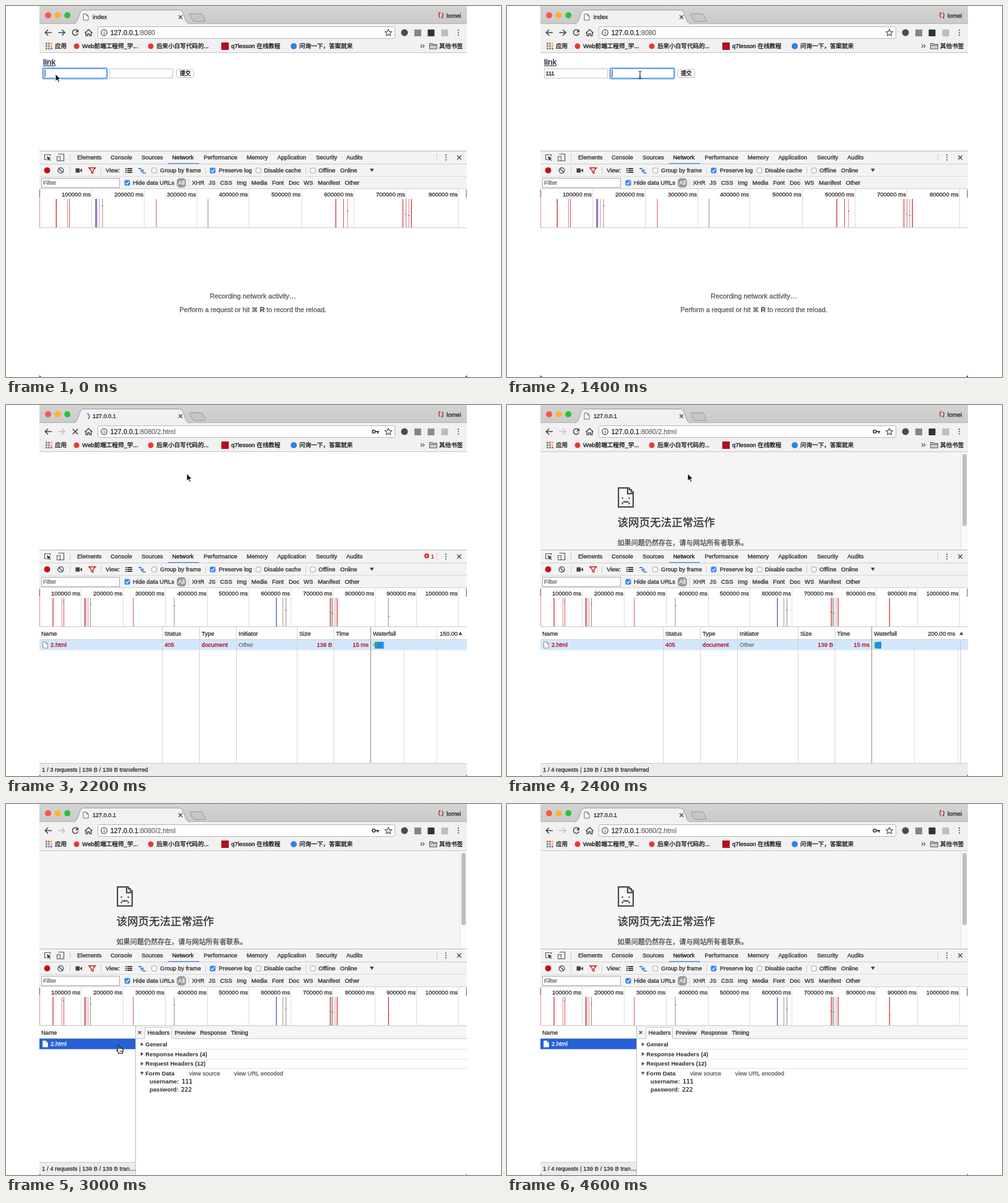
Recreate the animation shown at these times as an HTML page. Size 800x600 px, loop 4.8 s.

```html
<!DOCTYPE html>
<html lang="zh-CN">
<head>
<meta charset="utf-8">
<title>Form post demo</title>
<style>
html, body { margin: 0; width: 100%; height: 100%; overflow: hidden; background: #fff; }
svg { display: block; width: 800px; height: 600px; }
text { font-family: "Liberation Sans", "Noto Sans CJK SC", "Noto Sans CJK", sans-serif; white-space: pre; stroke-width: .28px; }
text[font-weight] { stroke-width: 0; }
.mono { font-family: "DejaVu Sans Mono", monospace; }
.sym { font-family: "DejaVu Sans", sans-serif; }
</style>
</head>
<body>
<svg id="stage" viewBox="0 0 800 600" xmlns="http://www.w3.org/2000/svg"></svg>
<script>
const LOOP = 4800;
const INK = '#2a2a2a', RED = '#b3061c';

// Markup helpers
const rect = (x, y, w, h, fill, more = '') =>
  `<rect x="${x}" y="${y}" width="${w}" height="${h}" fill="${fill}" ${more}/>`;
const box = (x, y, w, h, fill, stroke, r = 0) =>
  rect(x + .5, y + .5, w - 1, h - 1, fill, `stroke="${stroke}" rx="${r}"`);
const disc = (x, y, r, fill) => `<circle cx="${x}" cy="${y}" r="${r}" fill="${fill}"/>`;
const path = (d, stroke, w = 1, fill = 'none') =>
  `<path d="${d}" stroke="${stroke}" stroke-width="${w}" fill="${fill}"/>`;
const text = (x, y, s, size = 9.5, fill = INK, more = '') =>
  `<text x="${x}" y="${y}" font-size="${size}" fill="${fill}" stroke="${fill}" ${more}>${s}</text>`;
const endText = (x, y, s, size, fill) => text(x, y, s, size, fill, 'text-anchor="end"');
const bold = (x, y, s, size = 9.5, fill = INK) => text(x, y, s, size, fill, 'font-weight="bold"');
const vline = (x, y1, y2, c, w = 1) => rect(x, y1, w, y2 - y1, c);
const hline = (y, x1, x2, c, h = 1) => rect(x1, y, x2 - x1, h, c);
const cross = (x, y, r, c = '#555', w = 1.3) =>
  path(`M${x - r} ${y - r}l${2 * r} ${2 * r}M${x + r} ${y - r}l${-2 * r} ${2 * r}`, c, w);
const dots3 = (x, y, gap = 3.8) => [-1, 0, 1].map(i => disc(x, y + i * gap, 1.1, '#555')).join('');
const row = (y, items) => items.map(([x, s]) => text(x, y, s)).join('');
const group = (id, body) => `<g id="${id}">${body}</g>`;
const docIcon = (x, y, c = '#666') => path(`M${x} ${y}h5l3 3v7h-8zM${x + 5} ${y}v3h3`, c, 1, '#fff');
const check = (x, y, on) => on
  ? rect(x, y, 9, 9, '#3584ee', 'rx="2"') + path(`M${x + 2} ${y + 4.6}l2 2.2 3.2-4.6`, '#fff', 1.3)
  : box(x, y, 9, 9, '#fff', '#a0a0a0', 2);

function chrome() {
  let s = rect(54, 0, 691, 29, 'url(#bar)');
  s += hline(28, 54, 745, '#b2b2b2');
  s += rect(54, 29, 691, 46, '#f1f1f1');
  s += path('M109 29C114 28 114 26 116 22L120 10Q121.5 6.5 125 6.5H280Q284 6.5 285.5 10L290 22C292 27 293 28.5 297 29', '#999', 1, '#f1f1f1');
  s += rect(111, 28.5, 184, 1.5, '#f1f1f1');
  s += path('M298 12.5H315Q317 12.5 318 14.5L322 23Q322.5 25 321 25H305Q302.5 25 301.5 23L297 14Q296.5 12.5 298 12.5Z', '#979797', 1, '#c6c6c6');
  ['#fc5550', '#fdb42b', '#27c33b'].forEach((c, i) => s += disc(68 + i * 15.6, 15, 5, c));
  s += cross(282, 18, 3, '#444', 1.3);
  s += path('M701.5 11Q697.5 15 701.5 19M704 19Q708.5 15 704.5 11M702 11h-2.5M704 19h2.5', '#b8292c', 1.4);
  s += text(712, 18.6, 'lomei', 9.8, '#222');
  // toolbar
  s += path('M74 43H63.5M68 38.3L63.3 43L68 47.7', '#444', 1.6);
  s += path('M127.5 43.5L133.5 38L139.5 43.5M129.2 42.5V48H132V45H135V48H137.8V42.5', '#444', 1.4);
  s += box(148, 33, 481, 20, '#fff', '#b4b4b4', 2);
  s += `<circle cx="158.5" cy="43" r="4.8" fill="none" stroke="#444" stroke-width="1.2"/>`;
  s += rect(158, 42.2, 1.1, 3.4, '#444') + rect(158, 40.2, 1.1, 1.1, '#444');
  s += path('M618 37.7L619.6 41.2L623.4 41.6L620.6 44.2L621.4 48L618 46L614.6 48L615.4 44.2L612.6 41.6L616.4 41.2Z', '#444', 1.1);
  s += disc(644, 43, 5.5, '#4c4c4c') + rect(660, 38, 11, 11, '#858585');
  s += rect(703.5, 38, 11, 11, '#bdbdbd') + dots3(731, 43);
  // bookmarks
  const hues = ['#e04a3f', '#e04a3f', '#f0b429', '#3e9b4f', '#4c82e6', '#f0b429', '#3e9b4f', '#4c82e6', '#e04a3f'];
  hues.forEach((c, i) => s += rect(64 + i % 3 * 4, 59.5 + (i / 3 | 0) * 4, 2.7, 2.7, c));
  s += disc(114, 65, 4.5, '#e8392f') + disc(234, 65, 4.5, '#e8392f');
  s += rect(348, 59, 12, 12, '#b30d22') + disc(465, 65, 5, '#2f83e0');
  const mark = (x, t) => text(x, 68, t, 9.6, '#111');
  s += mark(79, '应用') + mark(123, 'Web前端工程师_学...') + mark(243, '后来小白写代码的...');
  s += mark(364, 'q7lesson 在线教程') + mark(474, '问询一下，答案就来') + mark(700, '其他书签');
  s += path('M670 62l2.5 2.7-2.5 2.7M673.5 62l2.5 2.7-2.5 2.7', '#444', 1.1);
  s += path('M684.5 60.5h4.5l1.3 1.5h6v7.5h-11.8zM684.5 63.5h11.8', '#666', 1.1, '#ccc');
  return s + hline(75, 54, 745, '#c4c4c4');
}

function devtools() {
  const sep = (x, y) => vline(x, y - 6, y + 6, '#ccc');
  let s = rect(54, 234, 691, 62, '#f3f3f3');
  s += hline(234, 54, 745, '#b9b9b9') + hline(255, 54, 745, '#cdcdcd');
  s += hline(275, 54, 745, '#dadada') + hline(295, 54, 745, '#cdcdcd');
  s += path('M66 248.5H62.5V240.5H71.5V243', '#555', 1.1) + path('M66 243l1.6 7.5 1.7-2.3 2.2 2.2 1-1-2.2-2.2 2.2-1.4z', 'none', 0, '#444');
  s += path('M85 240V239.5H93.5V250.5H88', '#555', 1.2) + box(82, 243, 6, 8, '#f3f3f3', '#555');
  s += sep(103, 245) + sep(696, 245) + dots3(711, 245) + cross(732.5, 245, 3.2, '#444');
  s += row(248, [[115, 'Elements'], [169, 'Console'], [219, 'Sources'], [319.5, 'Performance'], [389, 'Memory'],
    [438.5, 'Application'], [501, 'Security'], [550, 'Audits']]);
  s += text(268.5, 248, 'Network', 9.5, '#111') + hline(254, 262, 312, '#5b8cdd', 1.4);
  // record row
  s += disc(66.5, 265.8, 4.9, '#cb0a12');
  s += `<circle cx="88.5" cy="266" r="4.4" fill="none" stroke="#444" stroke-width="1.3"/>` + path('M85.4 263l6.2 6', '#444', 1.3);
  s += sep(103, 266) + rect(112.5, 262.5, 6.5, 7, '#444') + path('M119 266l4-3v6z', 'none', 0, '#444');
  s += path('M134 261.7H144.5L140.6 266.2V270.5L138 269V266.2Z', '#cc1520', 1.4) + sep(153, 266) + text(161, 269, 'View:');
  for (let i = 0; i < 3; i++) s += rect(193, 262 + i * 3, 2, 2, '#444') + rect(196, 262 + i * 3, 8, 2, '#444');
  s += rect(214, 262, 5, 1.7, '#3a6fc4') + rect(217, 264.8, 6, 1.7, '#3a6fc4') + rect(218, 267.4, 4, 1.7, '#3a6fc4') + rect(221, 269.4, 5, 1.5, '#3a6fc4');
  s += check(235, 261.5) + text(249, 269, 'Group by frame') + sep(322, 266);
  s += check(329.5, 261.5, 1) + text(344, 269, 'Preserve log');
  s += check(403.5, 261.5) + text(417, 269, 'Disable cache') + sep(484, 266);
  s += check(491.5, 261.5) + text(505, 269, 'Offline') + text(540, 269, 'Online');
  s += path('M588 263h6.5l-3.2 5.5z', 'none', 0, '#444');
  // filter row
  s += box(57, 278, 127, 16, '#fff', '#a9a9a9') + text(60, 289.3, 'Filter', 9.5, '#666');
  s += check(191.5, 281.5, 1) + text(205, 289.3, 'Hide data URLs');
  s += rect(276, 278.5, 15, 15, '#999', 'rx="5"') + text(278.3, 289.3, 'All', 9.5, '#fff') + vline(294.5, 280, 292, '#ccc');
  s += row(289.3, [[300.5, 'XHR'], [327.5, 'JS'], [346, 'CSS'], [373, 'Img'], [396.5, 'Media'], [430, 'Font'],
    [457, 'Doc'], [481, 'WS'], [504, 'Manifest'], [547.5, 'Other']]);
  return s;
}

// Overview: lines as [x, colour, width]
function overview(count, lines) {
  let s = rect(54, 296, 691, 63, '#fff');
  const step = 677.5 / count;
  for (let i = 1; i <= count; i++) {
    const x = Math.round(53.5 + i * step);
    s += vline(x, 296, 358, '#dcdcdc') + endText(x - 1, 307.5, i + '00000 ms');
  }
  for (const [x, c, w = 1] of lines) s += vline(x, 312, 358, c, w);
  return s + vline(54, 297, 310, '#555') + vline(743.5, 297, 310, '#555') + vline(54, 311, 358, '#e38a8a') +
    hline(358, 54, 745, '#c8c8c8');
}
const R = '#d9484b', L = '#e68182', G = '#8d8d8d', B = '#5b57d8';
const early = [[80.5, R, 1.6], [99, L], [102, R], [144.3, '#7c58a8', 1.6], [146.3, B], [150.5, L], [155.5, G], [242.5, R],
  [326, G], [532.3, R, 1.5], [545, R], [551.5, L], [640.3, R], [642.3, L], [646, G], [650.5, L], [654.5, R, 1.5]];
const late = [[75.3, R, 1.5], [90, L], [93, R], [126.5, R, 1.4], [128.5, '#b0566c'], [132, L], [136, G], [205.3, R], [271.5, G],
  [436.3, B, 1.4], [447, '#c08a93'], [452, G], [523.3, R, 1.4], [525.5, G], [527.5, G], [531.3, L], [534.5, R, 1.4]];
const specks = pts => pts.map(([x, y]) => rect(x, y, 1.5, 1.5, '#555')).join('');

const field = x => box(x, 101, 103, 16, '#fff', '#c3c3c3');
const ring = x => rect(x - .5, 100.5, 104, 17, '#fff', 'stroke="#a5c8f7" stroke-width="3" rx="2"') +
  rect(x + .2, 101.2, 102.6, 15.6, '#fff', 'stroke="#5796ea" stroke-width="1.4" rx="1"');

function formPage() {
  return text(60, 95, 'link', 13.4, '#151b3a') + hline(96.3, 60, 80, '#151b3a') +
    field(60) + field(167) + group('ring1', ring(60)) + group('ring2', ring(167)) +
    box(275, 102, 29, 14, '#fff', '#bdbdbd', 3) + text(281, 112.3, '提交', 8.8, '#111') +
    group('drop', box(60, 117, 103, 20, '#fff', '#b3bfca') + bold(67, 131.8, '111', 9.6, '#111')) +
    text(62.5, 112.3, '', 9.3, '#111', 'id="user"') + group('pass', '') +
    `<rect id="caret" y="103" width="1" height="12" fill="#111"/>`;
}

function errorPage() {
  const grey = '#4a4a4a';
  return rect(54, 76, 691, 158, '#f5f5f5') + rect(733, 76, 12, 158, '#fafafa') + vline(733, 76, 234, '#e4e4e4') +
    rect(736, 79, 7, 117, '#bfbfbf', 'rx="3.5"') +
    path('M198 134.1H180.1V164.9H203.9V143.4M194.9 134V143.4H205M198 134.1V137.2H201V140.3H203.9V144', grey, 2.2) +
    rect(185.5, 149.5, 2.2, 2.2, grey) + rect(196.5, 149.5, 2.2, 2.2, grey) +
    path('M186.6 160.5V157.8M187.7 156.7H196.5M197.6 157.8V160.5', grey, 2.2) +
    text(178.5, 196, '该网页无法正常运作', 17.5, '#2c2c2c') +
    text(178.5, 226.5, '如果问题仍然存在，请与网站所有者联系。', 11.1, '#4c4c4c');
}

const footer = (w, s) => rect(54, 579, w, 21, '#ececec') + hline(579, 54, 54 + w, '#c8c8c8') + text(58, 593, s);

function table() {
  let s = rect(54, 359, 691, 220, '#fff') + `<rect id="line" x="54" y="379.5" width="691" height="17"/>`;
  s += hline(379, 54, 745, '#c8c8c8');
  for (const x of [252, 312, 372, 470, 529.5]) s += vline(x, 359, 579, '#d2d2d2');
  s += vline(589, 359, 579, '#8a8a8a');
  s += row(372.7, [[57, 'Name'], [256, 'Status'], [316, 'Type'], [376, 'Initiator'], [474, 'Size'], [533.5, 'Time'], [593, 'Waterfall']]);
  s += docIcon(59.5, 383, '#8e8e8e') + text(72, 391.3, '2.html', 9.5, RED) + text(256, 391.3, '405', 9.5, RED);
  s += text(316, 391.3, 'document', 9.7, RED) + text(376, 391.3, 'Other', 9.5, '#707070');
  s += endText(527, 391.3, '139 B', 9.5, RED) + endText(586, 391.3, '15 ms', 9.5, RED);
  s += group('fallA', vline(643, 380, 579, '#e0e0e0') + vline(696, 359, 579, '#e0e0e0') + text(701, 373.3, '150.00') +
    path('M731 372h6.5l-3.2-5.5z', 'none', 0, '#555') + rect(593.5, 385.5, 3, 5, '#a8a8a8') +
    rect(596, 383, 4.5, 11, '#2fae57') + rect(600, 383, 10.5, 11, '#2389f0') + footer(691, '1 / 3 requests | 139 B / 139 B transferred'));
  s += group('fallB', vline(658, 380, 579, '#e0e0e0') + vline(728, 380, 579, '#e2dcf2') + vline(732.5, 380, 579, '#d3b3dc') +
    endText(724.5, 373.3, '200.00 ms') + path('M731 372h6.5l-3.2-5.5z', 'none', 0, '#555') +
    rect(594, 383.5, 3.5, 10, '#2fae57') + rect(597, 383, 8, 11, '#2389f0') + footer(691, '1 / 4 requests | 139 B / 139 B transferred'));
  return s;
}

function detail() {
  let s = rect(54, 359, 691, 241, '#fff') + text(57, 372.7, 'Name') + hline(379, 54, 209, '#c8c8c8');
  s += rect(54, 379.5, 155, 17, '#2560d4') + docIcon(59.5, 383, '#cfdcf5') + text(72, 391.3, '2.html', 9.5, '#fff');
  s += footer(155, '1 / 4 requests | 139 B / 139 B tran…') + vline(209, 359, 600, '#bdbdbd');
  s += rect(210, 359, 535, 20, '#f5f5f5') + hline(379, 210, 745, '#c8c8c8');
  s += rect(225, 361, 43, 19, '#fff') + path('M224.5 379.5V361.5H267.5V379.5', '#c6c6c6') + cross(216, 369.5, 2.3, '#444');
  s += row(373, [[228.5, 'Headers'], [272.5, 'Preview'], [313.5, 'Response'], [363.5, 'Timing']]);
  ['General', 'Response Headers (4)', 'Request Headers (12)'].forEach((t, i) => {
    const y = 391.8 + i * 15.7;
    s += path(`M217.8 ${y - 6.4}v6.4l4.6-3.2z`, 'none', 0, '#555') + bold(225.3, y, t) + hline(396 + Math.round(i * 15.5), 216, 745, '#e2e2e2');
  });
  s += path('M216.7 433.2h6l-3 5z', 'none', 0, '#555') + bold(225.3, 438.8, 'Form Data');
  s += text(296, 438.8, 'view source', 9.5, '#5c5c5c') + text(368.7, 438.8, 'view URL encoded', 9.5, '#5c5c5c');
  s += bold(232, 452.4, 'username:', 9.4) + bold(232, 464.7, 'password:', 9.4);
  s += text(284, 452.2, '111', 9.5, '#222', 'class="mono"') + text(283, 464.6, '222', 9.5, '#222', 'class="mono"');
  return s;
}

const cursors = {
  arrow: path('M0 0V11.8L2.8 9.2L4.8 13.6L6.7 12.8L4.8 8.5H8.4Z', '#fff', .9, '#111'),
  beam: path('M-2.5-5.5Q0-5.5 0-4V5Q0 6.5-2.5 6.5M2.5-5.5Q0-5.5 0-4M0 5Q0 6.5 2.5 6.5M-1.3 2.5H1.3', '#222', 1.1),
  hand: path('M-.8 6.5V1Q0-.6 1.3 1V5.2L2.8 4.7L4.3 5.2L5.8 5.5L7.3 6.5V10L6 13.5H.6L-2.8 8.7Q-3.2 7-1.8 7.2L-.8 8.5', '#111', 1.2, '#fff') +
    path('M2 8.5V11.5M3.8 8.5V11.5M5.4 8.5V11.5', '#111', .7)
};

const stage = document.getElementById('stage');
stage.innerHTML =
  `<defs><linearGradient id="bar" x2="0" y2="1"><stop stop-color="#d3d3d3"/><stop offset="1" stop-color="#cacaca"/></linearGradient></defs>` +
  chrome() +
  group('tabIdle', docIcon(125, 13)) +
  group('tabBusy', path('M131.5 13.5Q137.5 18 132.5 22.5', '#4a7de8', 1.8)) +
  text(140, 21.3, '', 9.1, '#222', 'id="title"') +
  `<path id="fwd" d="M84.5 43H95M90.3 38.3L95 43L90.3 47.7" fill="none" stroke-width="1.6"/>` +
  group('reload', path('M115.6 40A4.6 4.6 0 1 0 116.3 44.5', '#444', 1.5) + path('M117 37.5v5h-5z', 'none', 0, '#444')) +
  group('stop', cross(112, 43, 4.2, '#444', 1.6)) +
  text(168.5, 46.8, '127.0.0.1<tspan id="url" fill="#6c6c6c" stroke="#6c6c6c"></tspan>', 10.9, '#222') +
  group('key', `<circle cx="594.3" cy="43" r="2.4" fill="none" stroke="#444" stroke-width="1.7"/>` + path('M596.8 43H603M601 43v3', '#444', 1.9)) +
  `<rect id="ext" x="681.5" y="38" width="11" height="11" rx="1"/>` +
  group('form', formPage()) + group('error', errorPage()) + devtools() +
  group('badge', disc(680, 244, 4, '#d5262d') + cross(680, 244, 1.5, '#fff', 1) + text(686.7, 248, '1', 9.5, '#b3161d')) +
  group('early', overview(8, early) + specks([[80.5, 314], [155.5, 322], [551.5, 331], [645.5, 336], [650.5, 338]]) +
    text(399, 473, 'Recording network activity…', 11, '#555', 'text-anchor="middle"') +
    text(399, 495, 'Perform a request or hit <tspan class="sym" font-size="10.5">⌘</tspan> <tspan font-weight="bold">R</tspan> to record the reload.', 10.8, '#555', 'text-anchor="middle"') +
    path('M54 597v3h3zM745 597v3h-3z', 'none', 0, '#333')) +
  group('late', overview(10, late) + specks([[92.5, 317], [136, 322], [271.5, 324], [451.5, 331], [523, 334], [527, 336], [618, 341]]) +
    `<rect id="lastHit" x="617.5" y="312" height="46"/>`) +
  group('table', table()) + group('detail', detail()) +
  group('tip', rect(191, 392, 131, 19, '#000', 'opacity=".12" rx="2"') + box(190, 390, 131, 19, '#f6f6f6', '#d0d0d0', 1) +
    text(196, 402.8, 'http://127.0.0.1:8080/2.html', 9.7, '#808080')) +
  group('corners', path('M54 598v2h2zM745 598v2h-2z', 'none', 0, '#333')) +
  Object.keys(cursors).map(k => group(k, cursors[k])).join('');

const el = id => document.getElementById(id);
const show = (id, on) => el(id).setAttribute('display', on ? 'inline' : 'none');
const set = (id, k, v) => el(id).setAttribute(k, v);

// Pointer stops: [from ms, kind, x, y]
const stops = [[0, 'arrow', 80, 110], [600, ''], [1200, 'beam', 160, 111], [1400, 'beam', 215, 111], [1600, ''],
  [2000, 'arrow', 292, 111], [2600, 'hand', 198, 385], [2800, 'hand', 182, 390], [3200, 'hand', 222, 403],
  [3400, 'arrow', 264, 450], [3600, 'arrow', 265, 453], [4600, '']];
const at = (list, t) => list.filter(s => s[0] <= t).pop();

function draw(t) {
  const sent = t >= 2200, failed = t >= 2400, open = t >= 3000, loading = sent && !failed;
  show('form', !sent); show('error', failed);
  show('early', !sent); show('late', sent); show('corners', sent);
  show('table', sent && !open); show('detail', open);
  show('fallA', loading); show('fallB', failed);
  show('tabIdle', !loading); show('tabBusy', loading);
  show('reload', !loading); show('stop', loading); show('badge', loading);
  show('key', t >= 1600); show('tip', t >= 2800 && !open);
  el('title').textContent = sent ? '127.0.0.1' : 'index';
  set('title', 'font-size', sent ? 9.1 : 9.7);
  el('url').textContent = sent ? ':8080/2.html' : ':8080';
  set('fwd', 'stroke', sent ? '#c2c2c2' : '#444');
  set('ext', 'fill', loading ? '#8c8c8c' : '#333');
  set('line', 'fill', t < 2800 ? '#d4e8fc' : '#e1edfa');
  set('lastHit', 'fill', failed ? R : G);
  set('lastHit', 'width', failed ? 1.5 : 1);

  // form typing
  const second = t >= 1400;
  const typed = at([[0, ''], [600, '1'], [1000, '111']], t)[1];
  const masked = at([[0, 0], [1600, 1], [1800, 3]], t)[1];
  show('ring1', !second); show('ring2', second);
  show('drop', t >= 600 && t < 1000);
  el('user').textContent = typed;
  el('pass').innerHTML = [0, 1, 2].slice(0, masked).map(i => disc(172 + i * 5.5, 109, 2, '#111')).join('');
  set('caret', 'x', second ? 169.5 + masked * 5.5 : 62.5 + typed.length * 5.1);
  show('caret', !(t >= 400 && t < 600) && !(t >= 2000));

  const [, kind, x, y] = at(stops, t);
  for (const k in cursors) {
    show(k, k === kind);
    if (k === kind) set(k, 'transform', `translate(${x} ${y})`);
  }
}

const start = performance.now();
function tick() {
  draw((performance.now() - start) % LOOP);
  requestAnimationFrame(tick);
}
draw(0);
requestAnimationFrame(tick);
</script>
</body>
</html>
```
